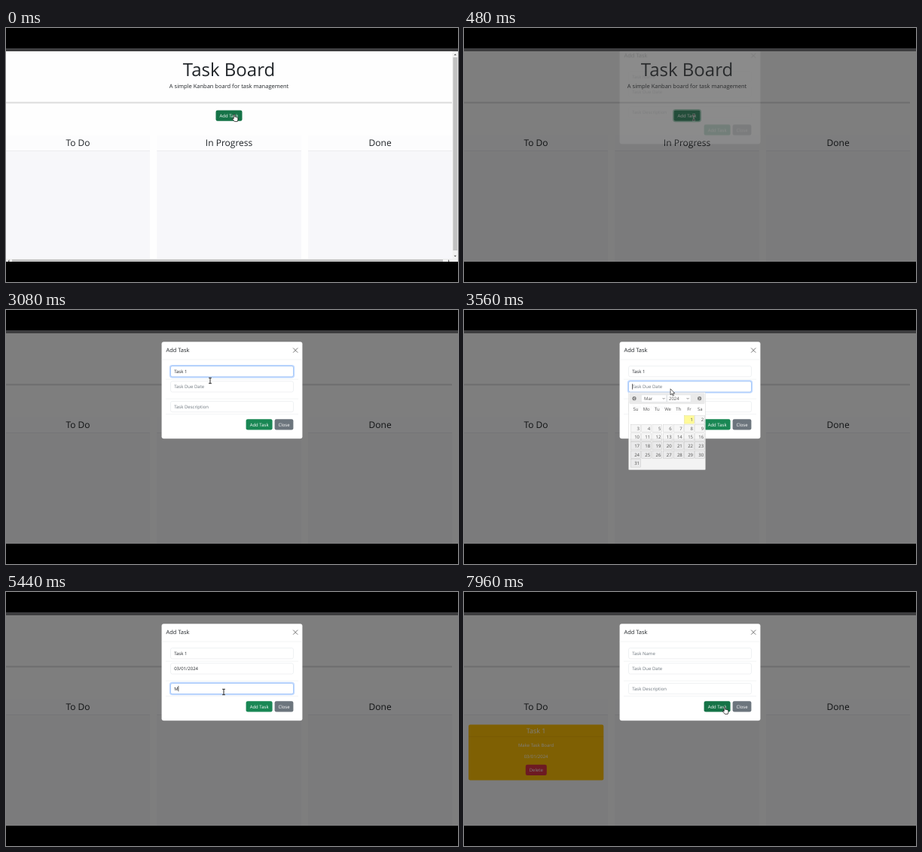
Recreate the animation shown at these times as an HTML page. Size 600 by 338 pixels, loop 8 s.

```html
<!DOCTYPE html>
<html lang="en">
<head>
<meta charset="utf-8">
<title>Task Board</title>
<style>
  html, body { margin: 0; width: 100%; height: 100%; overflow: hidden; background: #000; }
  svg { display: block; width: 100vw; height: 100vh; }
  text { font: 6px "Open Sans", "Noto Sans", sans-serif; fill: #212529; white-space: pre; text-rendering: geometricPrecision; }
  .mid { text-anchor: middle; }
  .end { text-anchor: end; }
  .white { fill: #fff; }
  .h1 { font-size: 24px; }
  .h2 { font-size: 12px; }
  .h4 { font-size: 9px; }
  .lead { font-size: 7.5px; }
  .hint { fill: #6c757d; }
  .box { fill: #fff; stroke: #dee2e6; stroke-width: .5; }
  .ring { fill: none; stroke: #0d6efd; stroke-opacity: .25; stroke-width: 1.5; }
  .edge { fill: none; stroke: #86b7fe; stroke-width: .6; }
  .day { fill: #f6f6f6; stroke: #c5c5c5; stroke-width: .4; }
  .today { fill: #fffa90; stroke: #dad55e; }
  #cal text { fill: #454545; }
</style>
</head>
<body>
<svg viewBox="0 0 600 338">
  <defs>
    <clipPath id="view"><rect y="31" width="600" height="280"/></clipPath>
  </defs>
  <rect width="600" height="338"/>
  <rect y="27" width="600" height="4" fill="#3d3d3f"/>

  <g clip-path="url(#view)">
    <rect y="31" width="600" height="280" fill="#fefefe"/>
    <text class="h1 mid" x="296" y="63.8">Task Board</text>
    <text class="lead mid" x="296" y="80.3">A simple Kanban board for task management</text>
    <rect y="98.4" width="592" height="2" fill="#dcdcdd"/>
    <rect id="openRing" x="277.8" y="108.7" width="36.5" height="15.7" rx="3" fill="none" stroke="#3c996e" stroke-opacity=".5" stroke-width="1.5"/>
    <rect x="278.5" y="109.4" width="35" height="14.3" rx="2.25" fill="#157347"/>
    <text class="mid white" x="296" y="118.7">Add Task</text>
    <g id="columns"></g>
    <g id="card">
      <rect x="6" y="176.4" width="179.3" height="74" rx="2.25" fill="#ffc107"/>
      <rect x="6" y="192.6" width="179.3" height=".4" fill="#000" fill-opacity=".12"/>
      <text class="h4 mid white" x="95.6" y="188">Task 1</text>
      <text class="mid white" x="95.6" y="206">Make Task Board</text>
      <text class="mid white" x="95.6" y="221.2">03/01/2024</text>
      <rect x="81.8" y="229.8" width="28" height="14.3" rx="2.25" fill="#dc3545"/>
      <text class="mid white" x="95.8" y="239.1">Delete</text>
    </g>
    <g id="bars">
      <path d="M592.5 31H600V311H0V307H592.5Z" fill="#f1f1f1"/>
      <rect x="593.4" y="39" width="5.8" height="257" fill="#c1c1c1"/>
      <rect x="8" y="308" width="572" height="3" fill="#c1c1c1"/>
      <path d="M594.6 36.3L596.3 34.4 598 36.3ZM594.6 302.7L596.3 304.6 598 302.7Z" fill="#505050"/>
      <path d="M4.4 308V311H3L2.8 310ZM587 308V311H588L588.6 310Z" fill="#606060"/>
    </g>
    <rect id="shade" y="31" width="600" height="280"/>

    <g id="modal">
      <rect x="206.5" y="42.2" width="187" height="129" rx="3" fill="#fff" stroke="#000" stroke-opacity=".175" stroke-width=".4"/>
      <path d="M206.7 66H393.3M212 92.2H388M212 118.2H388M212 138.6H388" stroke="#e6e8ea" stroke-width=".5"/>
      <text class="lead" x="212.4" y="56.3">Add Task</text>
      <path id="cross" d="M381.4 50.8l5.6 5.6m0-5.6l-5.6 5.6" stroke="#000" stroke-width=".9" stroke-linecap="round"/>
      <rect id="closeRing" class="ring" x="378.2" y="47.6" width="12.2" height="12.2" rx="2.5"/>
      <g id="fields"></g>
      <rect id="add" x="318.6" y="145.2" width="35" height="14.3" rx="2.25"/>
      <text class="mid white" x="336.1" y="154.5">Add Task</text>
      <rect x="356.6" y="145.2" width="24.8" height="14.3" rx="2.25" fill="#6c757d"/>
      <text class="mid white" x="369" y="154.5">Close</text>
    </g>

    <g id="cal">
      <rect x="218.5" y="109.4" width="102" height="103.4" rx="1.1" fill="#fff" stroke="#c5c5c5" stroke-width=".4"/>
      <rect x="219.8" y="110.7" width="99.4" height="14" rx="1.1" fill="#e9e9e9" stroke="#ddd" stroke-width=".4"/>
      <circle cx="226" cy="117.7" r="2.6" fill="#777"/>
      <circle cx="312.6" cy="117.7" r="2.6" fill="#777"/>
      <path d="M227 116.2l-1.8 1.5 1.8 1.5M311.6 116.2l1.8 1.5-1.8 1.5" fill="none" stroke="#fff" stroke-width=".7"/>
      <rect class="box" x="235.5" y="113" width="33" height="9.4"/>
      <rect class="box" x="270" y="113" width="31" height="9.4"/>
      <path d="M263.6 117l1.5 1.5 1.5-1.5M295.6 117l1.5 1.5 1.5-1.5" fill="none" stroke="#333" stroke-width=".6"/>
      <text x="239" y="119.9">Mar</text>
      <text x="272" y="119.9">2024</text>
    </g>
  </g>

  <g id="cursor">
    <path id="hand" d="M-.8.6Q-.8-.2 0-.2T.8.6V3.4L1.6 3.1 2.3 3.6 3.1 3.4 3.8 3.9 4.6 4 4.9 4.9V7.2L4.2 9.4H.3L-2.3 6.2Q-2.8 5.3-2 4.9L-.8 5.8Z" fill="#fff" stroke="#000" stroke-width=".7"/>
    <g id="beam" fill="none">
      <path d="M-2-3.7H2M-2 3.7H2M0-3.7V3.7" stroke="#fff" stroke-opacity=".6" stroke-width="1.7"/>
      <path d="M-1.9-3.7H1.9M-1.9 3.7H1.9M0-3.7V3.7" stroke="#111" stroke-width=".9"/>
    </g>
    <path id="arrow" d="M0 0V8.2L1.9 6.5 3.2 9.3 4.4 8.7 3.2 6H5.8Z" fill="#fff" stroke="#000" stroke-width=".6"/>
  </g>
</svg>

<script>
const LOOP = 8000;
const $ = id => document.getElementById(id);

function make(parent, tag, attrs, text) {
  const el = document.createElementNS("http://www.w3.org/2000/svg", tag);
  for (const k in attrs) el.setAttribute(k, attrs[k]);
  if (text !== undefined) el.textContent = text;
  parent.append(el);
  return el;
}

// Board columns
[["To Do", 0, 191], ["In Progress", 200.3, 191.5], ["Done", 401, 191.3]].forEach(([name, x, width]) => {
  const g = $("columns");
  make(g, "rect", { x, y: 143, width, height: 20.6, fill: "#fcfcfd" });
  make(g, "rect", { x, y: 163.6, width, height: 148, fill: "#f7f7fa" });
  make(g, "rect", { x, y: 163.3, width, height: .5, fill: "#dddde1" });
  make(g, "text", { class: "h2 mid", x: x + width / 2, y: 157.2 }, name);
});

// March 2024 starts on a Friday
const colX = i => 221.6 + 14.2 * i;
["Su", "Mo", "Tu", "We", "Th", "Fr", "Sa"].forEach((d, i) =>
  make($("cal"), "text", { class: "mid", x: colX(i) + 6.4, y: 134.3, "font-weight": 600 }, d));
for (let d = 1; d <= 31; d++) {
  const cell = d + 4, x = colX(cell % 7), y = 140.7 + 11.6 * Math.floor(cell / 7);
  make($("cal"), "rect", { class: d === 1 ? "day today" : "day", x, y, width: 12.8, height: 10.4 });
  make($("cal"), "text", { class: "end", x: x + 11.4, y: y + 7.5 }, d);
}

// Form fields: focus span, typed text, key times
const CLEAR = 7880, PICK = 3960;
const fields = [
  { y: 74.6, hint: "Task Name", on: 1080, off: 3380, text: "Task 1", keys: [1960, 2080, 2200, 2300, 2400, 2500] },
  { y: 94.9, hint: "Task Due Date", on: 3380, off: PICK, text: "03/01/2024", keys: Array(10).fill(PICK) },
  { y: 121.5, hint: "Task Description", on: 4380, off: CLEAR, text: "Make Task Board",
    keys: Array.from({ length: 15 }, (_, i) => 5340 + 120 * i) }
];
fields.forEach(f => {
  const size = { x: 218.5, y: f.y, width: 163, height: 14.2, rx: 2.25 }, g = $("fields");
  make(g, "rect", { class: "box", ...size });
  f.focus = make(g, "g", {});
  make(f.focus, "rect", { class: "ring", x: 217.6, y: f.y - .9, width: 164.8, height: 16, rx: 3 });
  make(f.focus, "rect", { class: "edge", ...size });
  f.label = make(g, "text", { x: 223.2, y: f.y + 9.2 });
  f.caret = make(g, "rect", { y: f.y + 3.4, width: .6, height: 7.4 });
});

// Pointer path [time, x, y] and shapes [time, id]
const path = [
  [0, 303, 115], [400, 303, 115], [480, 305, 119], [620, 305, 119], [1020, 270, 90], [2900, 270, 90],
  [3080, 271, 94], [3320, 272, 102], [3500, 272, 102], [3880, 305, 148], [4000, 305, 148],
  [4120, 307, 148.5], [4360, 289, 133], [7080, 289, 133], [7380, 367, 177], [7640, 346, 153], [LOOP, 346, 153]
];
const shapes = [[0, "hand"], [440, "beam"], [3560, "arrow"], [3740, "hand"], [4200, "beam"], [7160, "arrow"], [7580, "hand"]];

const ramp = (t, from, span) => Math.min(1, Math.max(0, (t - from) / span));
const swing = p => .5 - Math.cos(p * Math.PI) / 2;
const fade = (el, v) => el.setAttribute("opacity", v);
const span = (t, on, off, ms) => swing(ramp(t, on, ms)) - swing(ramp(t, off, ms));

function drawField(f, t) {
  const count = t >= CLEAR ? 0 : f.keys.filter(k => k <= t).length;
  f.label.textContent = count ? f.text.slice(0, count) : f.hint;
  f.label.setAttribute("class", count ? "" : "hint");
  fade(f.focus, span(t, f.on, f.off, f.off === CLEAR ? 80 : 150));
  const since = t - (count ? Math.max(f.on, f.keys[count - 1]) : f.on);
  const blink = t >= f.on && t < f.off && since % 1060 < 530;
  fade(f.caret, blink ? 1 : 0);
  if (blink) f.caret.setAttribute("x", 223.2 + (count ? f.label.getComputedTextLength() : 0));
}

function drawCursor(t) {
  const i = path.findIndex(p => p[0] > t);
  const [t0, x0, y0] = path[i - 1], [t1, x1, y1] = path[i];
  const p = swing((t - t0) / (t1 - t0));
  $("cursor").setAttribute("transform", `translate(${x0 + (x1 - x0) * p} ${y0 + (y1 - y0) * p})`);
  const shape = shapes.filter(s => s[0] <= t).pop()[1];
  for (const id of ["hand", "beam", "arrow"]) fade($(id), id === shape ? 1 : 0);
}

function draw(t) {
  fade($("bars"), t < 300 ? 1 : 0);
  fade($("openRing"), ramp(t, 280, 100));
  fade($("shade"), .5 * ramp(t, 300, 150));
  fade($("modal"), ramp(t, 465, 150));
  const rise = -18.75 * (1 - ramp(t, 465, 300)) ** 2;
  $("modal").setAttribute("transform", `translate(0 ${rise})`);
  fields.forEach(f => drawField(f, t));
  const closeFocus = span(t, PICK, 4380, 60);
  fade($("closeRing"), closeFocus);
  fade($("cross"), .6 + .4 * closeFocus);
  fade($("cal"), span(t, 3400, PICK, 200));
  $("add").setAttribute("fill", t >= 7580 ? "#157347" : "#198754");
  fade($("card"), t >= CLEAR ? 1 : 0);
  drawCursor(t);
}

const start = performance.now();
function tick() {
  draw((performance.now() - start) % LOOP);
  requestAnimationFrame(tick);
}
tick();
</script>
</body>
</html>
```
